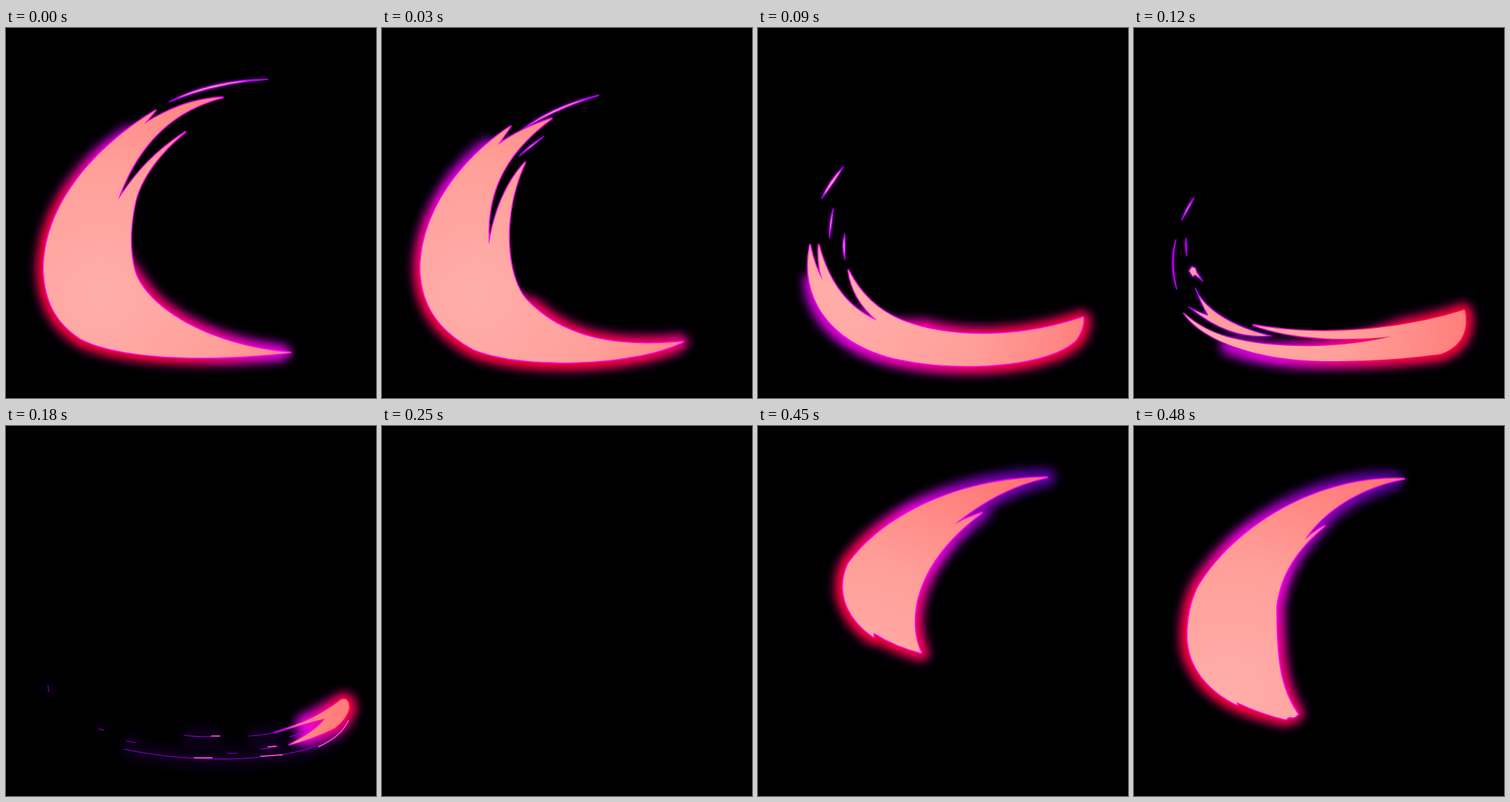
An HTML page for the animation above (0.51 s loop, 512 by 512 pixels).

```html
<!DOCTYPE html>
<html lang="en">
<head>
<meta charset="utf-8">
<title>Crescent slash</title>
<style>
html, body { margin: 0; width: 100%; height: 100%; overflow: hidden; background: #000; }
svg { display: block; width: 100%; height: 100%; }
path { stroke-linejoin: round; }
.halo { fill: #2c0060; stroke: #2c0060; stroke-width: 28; opacity: .45; filter: url(#wide); }
.aura { fill: none; stroke: #40007c; stroke-width: 18; opacity: .3; filter: url(#wide); }
.glow { stroke-width: 21; filter: url(#soft); }
.haze { fill: #70c; stroke: #70c; stroke-width: 2; opacity: .6; filter: url(#near); }
.body { fill: url(#tint); stroke-width: 3; paint-order: stroke; }
.chip { fill: #ff9c9c; stroke: #b400e6; stroke-width: 1.4; }
.line { fill: none; stroke: #8a00c4; stroke-width: 1.1; }
.hot { fill: none; stroke: #ff58c8; stroke-width: 1.5; }
</style>
</head>
<body>
<svg viewBox="0 0 512 512" preserveAspectRatio="none">
  <defs>
    <radialGradient id="tint" gradientUnits="userSpaceOnUse" cx="130" cy="370" r="400">
      <stop offset="0" stop-color="#ffaeaa"/>
      <stop offset=".45" stop-color="#ff9f99"/>
      <stop offset="1" stop-color="#ff6e6e"/>
    </radialGradient>
    <filter id="soft" filterUnits="userSpaceOnUse" x="0" y="0" width="512" height="512" color-interpolation-filters="sRGB"><feGaussianBlur stdDeviation="6.5"/></filter>
    <filter id="wide" filterUnits="userSpaceOnUse" x="0" y="0" width="512" height="512" color-interpolation-filters="sRGB"><feGaussianBlur stdDeviation="9"/></filter>
    <filter id="near" filterUnits="userSpaceOnUse" x="0" y="0" width="512" height="512" color-interpolation-filters="sRGB"><feGaussianBlur stdDeviation="2"/></filter>
  </defs>
</svg>
<script>
const LOOP = 510;
const svg = document.querySelector('svg');

// axis: glow colour runs from violet to red along x1, y1, x2, y2
const poses = [
  { at: 0, axis: [330, 80, 60, 300],
    body: 'M207 114C130 160 52 240 52 335C54 380 70 408 103 430C150 455 260 464 394 449C300 442 210 400 182 346C172 325 169 285 179 240C186 210 212 172 248 144C205 172 180 200 155 238C170 195 205 120 300 96C255 98 220 115 191 133Z',
    glow: 'M172 146C118 178 53 248 53 335C54 380 70 408 103 430C150 453 260 462 382 449C301 441 220 404 188 358Q145 300 122 240Q135 190 172 146Z',
    chips: 'M226 102C262 82 310 71 362 71C320 74 275 83 226 102Z' },
  { at: 30, axis: [300, 20, 150, 440],
    body: 'M178 136C110 180 53 255 53 335C55 390 85 422 127 445C200 474 355 466 417 434C320 443 250 428 200 376C172 345 164 260 198 186C170 215 154 260 148 300C144 240 160 180 235 125Q190 140 160 162Z',
    glow: 'M146 164C103 196 54 264 54 335C56 390 85 422 127 445C200 474 355 466 412 435C325 443 260 432 210 386Q150 370 118 300Q115 220 146 164Z',
    chips: 'M191 143C220 119 255 103 300 93C260 106 225 121 191 143ZM190 177Q205 161 224 150Q207 165 190 177Z' },
  { at: 60, axis: [-400, 250, 430, 440],
    body: 'M149 160C90 200 56 270 56 335C58 400 100 440 150 460C250 495 400 468 435 417C350 442 270 434 218 402C180 370 172 325 162 271Q156 285 155 300Q153 270 161 238C142 262 136 310 143 361C122 310 118 260 131 218Q143 190 171 152Q150 165 128 190Z',
    glow: 'M122 188C86 217 57 275 57 335C59 400 100 440 150 460C250 495 400 468 431 420C350 442 275 435 228 408C170 395 125 370 105 330Q92 250 122 188Z',
    chips: 'M151 184C161 168 178 151 196 146C180 159 165 171 151 184ZM178 168Q190 153 238 121Q206 147 178 168ZM173 220Q183 199 207 177Q188 200 173 220Z' },
  { at: 90, axis: [-300, 380, 440, 420],
    body: 'M72 300C58 370 95 430 180 455C270 478 400 470 440 432Q452 415 450 400C370 428 270 432 200 405Q150 385 125 335Q130 375 165 405Q105 380 84 300Q82 330 90 350Q78 330 72 300Z',
    glow: 'M74 350C76 398 118 438 180 455C270 478 400 470 440 432Q452 415 449 402C370 428 290 432 230 414Q160 420 112 390Z',
    chips: 'M118 192Q98 211 88 236Q106 214 118 192ZM104 250Q98 268 99 290Q103 270 104 250ZM120 285Q115 300 120 320Q121 302 120 285Z' },
  { at: 120, axis: [-150, 430, 440, 420], rim: 1,
    body: 'M69 395C95 432 170 461 270 461C340 461 390 456 425 451Q455 440 459 412Q460 395 457 390C380 414 270 430 165 411C215 430 290 434 355 427C280 445 190 444 130 428Q95 418 69 395Z',
    glow: 'M130 440C165 454 215 460 270 460C340 460 390 455 425 450Q454 439 458 412Q459 396 456 392C425 403 395 409 372 413Q290 446 190 447Z',
    chips: 'M85 360C95 385 130 412 190 426C150 430 115 418 76 386Q95 396 102 397Q92 380 85 360ZM83 235Q73 246 66 266Q76 250 83 235ZM58 293C51 315 52 340 59 361C53 335 53 315 58 293ZM72 291Q70 302 73 315Q73 302 72 291ZM80 330l5 2 2 6 8 12-10-8-4 2-5-8z' },
  { at: 150, axis: [0, 440, 455, 410], rim: 1,
    body: 'M235 456C320 464 400 455 440 442Q472 420 468 386Q464 380 457 385C400 412 340 424 270 425Q350 430 410 420C360 440 300 448 230 445C300 452 340 450 375 446Q310 458 235 456Z',
    glow: 'M330 457Q400 454 440 442Q472 420 468 386Q464 380 457 385Q430 400 400 408L385 440Z',
    chips: 'M58 325Q54 343 59 362Q58 343 58 325Z',
    lines: 'M115 427Q160 445 235 456M130 418Q190 436 270 425M150 438Q190 447 230 445' },
  { at: 180, axis: [290, 440, 495, 380], rim: 1,
    body: 'M392 441Q430 421 441 405Q408 413 372 424C410 413 440 397 463 379Q474 374 475 390Q472 405 455 418Q425 433 392 441Z',
    glow: 'M412 432L436 408L412 411Q444 395 464 381Q473 377 474 390Q472 404 455 417Q434 427 412 432Z',
    lines: 'M163 447C220 460 300 465 360 457C420 452 460 435 474 405M58 359l1 9M166 436l13 2M128 419l8 2M246 428q25 3 52 1M336 429Q358 428 380 422M392 430Q408 427 418 419M352 447Q366 446 377 443M306 453h14',
    hot: 'M260 459h26M284 429h12M352 457Q368 456 383 455M432 444Q464 430 474 407M362 444l12-1' },
  { at: 250 },
  { at: 420, axis: [400, 75, 195, 140],
    body: 'M422 70C340 72 240 88 205 116Q190 128 200 154Q202 145 209 137Q213 172 238 200C255 160 310 110 366 97Q350 100 331 105C355 92 390 78 422 70Z',
    glow: 'M405 72C335 74 240 89 206 117Q193 128 202 150L220 180L238 196C255 160 310 110 355 98C375 86 390 78 405 72Z' },
  { at: 450, axis: [390, 75, 130, 230],
    body: 'M400 71C290 72 180 115 125 190C108 225 120 265 160 292L160 286Q190 305 226 314C205 270 215 190 310 120Q290 126 272 136C310 105 350 82 400 71Z' },
  { at: 480, axis: [360, 75, 75, 300],
    body: 'M374 73C270 68 150 125 90 220Q74 250 74 290C74 335 105 368 143 386L142 382Q175 398 210 406L214 403L222 403L227 399C205 365 197 335 197 250C202 210 220 175 264 138Q248 146 236 158C260 120 310 85 374 73Z',
    glow: 'M360 75C270 70 150 125 90 220Q74 250 74 290C74 335 105 368 143 385Q175 398 210 404L224 398C205 365 197 335 197 250C202 210 220 175 250 146C270 115 310 90 360 75Z' }
];

function add(parent, tag, attrs) {
  const el = document.createElementNS('http://www.w3.org/2000/svg', tag);
  for (const key in attrs) el.setAttribute(key, attrs[key]);
  return parent.appendChild(el);
}

function addRamp(id, [x1, y1, x2, y2]) {
  const ramp = add(svg.querySelector('defs'), 'linearGradient',
    { id, gradientUnits: 'userSpaceOnUse', x1, y1, x2, y2 });
  const stops = [[0, '#5800a0'], [.35, '#9400b8'], [.58, '#ee00e0'], [.86, '#ff0050'], [1, '#ff0038']];
  for (const [offset, color] of stops) add(ramp, 'stop', { offset, 'stop-color': color });
}

function build(pose, i) {
  const g = add(svg, 'g', { display: 'none' });
  const layer = (name, d, attrs) => d && add(g, 'path', { class: name, d, ...attrs });
  if (!pose.body) return g;
  addRamp('ramp' + i, pose.axis);
  const ramp = `url(#ramp${i})`;
  const glow = pose.glow || pose.body;
  layer('halo', glow);
  layer('aura', pose.lines);
  layer('glow', glow, { fill: ramp, stroke: ramp });
  layer('haze', pose.chips);
  layer('line', pose.lines);
  layer('hot', pose.hot);
  layer('chip', pose.chips);
  layer('body', pose.body, { stroke: pose.rim ? ramp : '#fa00ee' });
  return g;
}

const groups = poses.map(build);
let shown = -1;

function draw() {
  const t = performance.now() % LOOP;
  const now = poses.findLastIndex(p => p.at <= t);
  if (now !== shown) {
    groups.forEach((g, i) => g.setAttribute('display', i === now ? 'inline' : 'none'));
    shown = now;
  }
  requestAnimationFrame(draw);
}
draw();
</script>
</body>
</html>
```
